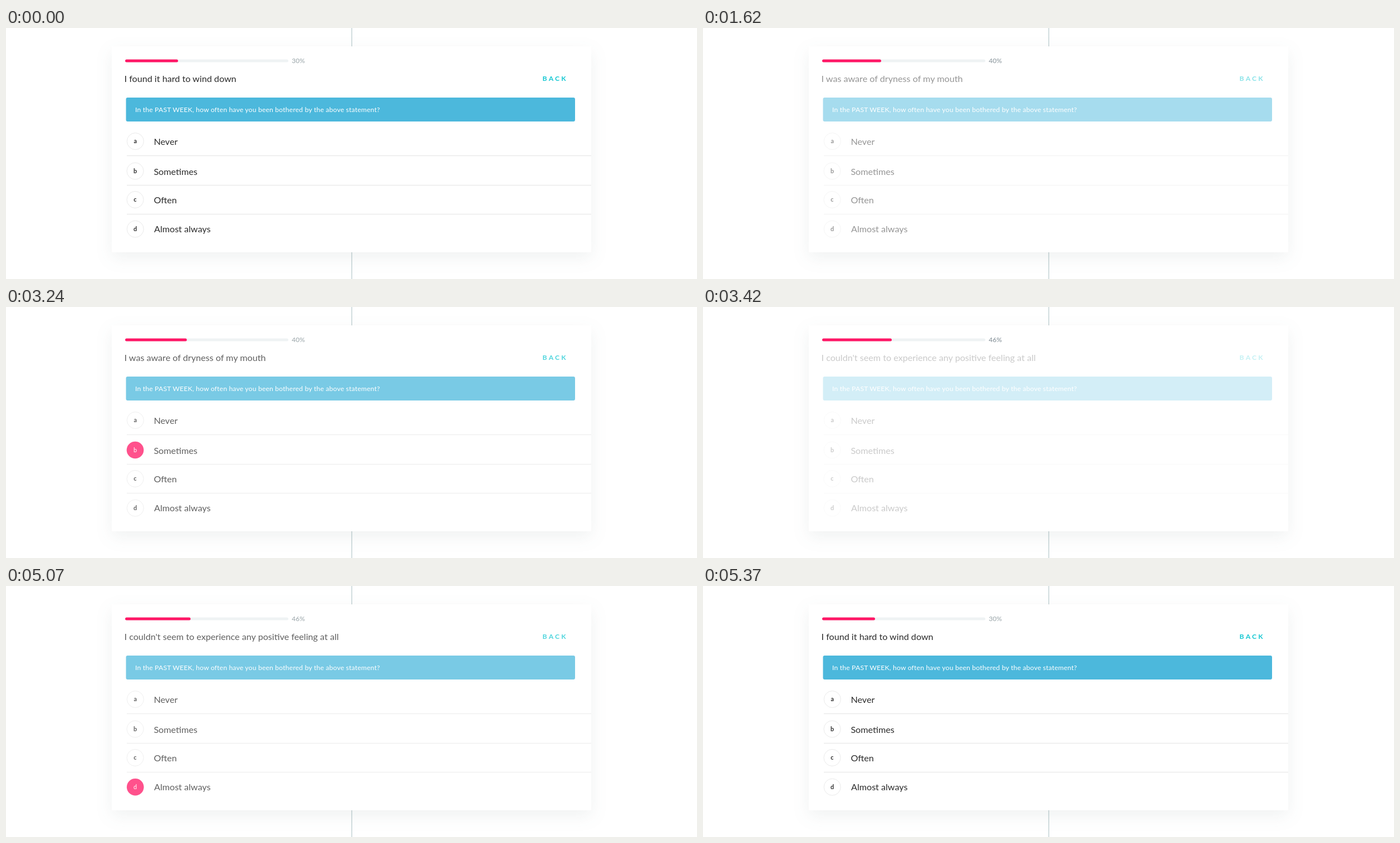
An HTML page for the animation above (5.4 s loop, 1241 by 451 pixels).

```html
<!DOCTYPE html>
<html lang="en">
<head>
<meta charset="utf-8">
<title>Questionnaire</title>
<style>
  html, body { margin: 0; width: 100%; height: 100%; overflow: hidden; background: #fff; }
  svg { display: block; width: 100%; height: 100%; font-family: Lato, "Open Sans", sans-serif; }

  .card { fill: #fff; filter: drop-shadow(0 10px 15px rgba(50, 75, 85, .075)); }
  .stem { fill: #d3dee0; }
  .track { fill: #eff3f4; }
  .bar { fill: #ff1766; width: 95px; }
  .percent { font-size: 12px; fill: #9aa5a9; }
  .title, .answer { font-size: 16.15px; fill: #2b2b2b; }
  .back { font-size: 12.2px; font-weight: 700; letter-spacing: 3.2px; fill: #12c7d2; }
  .banner { fill: #4cb8dc; }
  .prompt { font-size: 12.2px; letter-spacing: .165px; fill: #fff; }
  .ring { fill: #fff; stroke: #e9e9e9; }
  .rule { stroke: #e4e4e4; }
  .letter { font-size: 10.8px; font-weight: 700; text-anchor: middle; fill: #2b2b2b; }
  .picked circle { fill: #ff1766; }
  .picked .letter { fill: #fff; font-weight: 400; }

  /* Every change advances in four 30 ms steps of a 5400 ms loop. */
  .bar, .fade, .percent, .picked { animation: 5400ms steps(4, end) infinite; }
  .bar { animation-name: progress; }
  .fade { animation-name: fade; }
  .percent { animation-name: tint; }
  .picked { opacity: 0; }
  .pick-a { animation-name: pick-a; }
  .pick-b { animation-name: pick-b; }
  .pick-d { animation-name: pick-d; }
  .q1, .q2, .q3 { animation: 5400ms step-end infinite; }
  .q1 { animation-name: first; }
  .q2 { animation-name: second; }
  .q3 { animation-name: third; }

  @keyframes fade {
    0%, 25.55%, 31.11%, 59.44%, 64.99%, 93.33%, 99.44%, 100% { opacity: 1; }
    27.77%, 28.88%, 61.66%, 62.77%, 95.55%, 97.22% { opacity: 0; }
  }
  @keyframes progress {
    0%, 25.55%, 95.55%, 100% { width: 95px; }
    27.77%, 59.44% { width: 106px; }
    61.66%, 93.33% { width: 125px; }
  }
  @keyframes tint {
    0%, 27.76%, 31.11%, 61.65%, 64.99%, 95.54%, 99.44%, 100% { fill: #9aa5a9; }
    27.77%, 28.88%, 61.66%, 62.77%, 95.55%, 97.22% { fill: #74818a; }
  }
  @keyframes pick-a {
    0%, 12.22%, 27.77%, 100% { opacity: 0; }
    14.44%, 27.76% { opacity: 1; }
  }
  @keyframes pick-b {
    0%, 46.11%, 61.66%, 100% { opacity: 0; }
    48.33%, 61.65% { opacity: 1; }
  }
  @keyframes pick-d {
    0%, 79.99%, 95.55%, 100% { opacity: 0; }
    82.22%, 95.54% { opacity: 1; }
  }
  @keyframes first {
    0%, 95.55%, 100% { opacity: 1; }
    27.77% { opacity: 0; }
  }
  @keyframes second {
    0%, 61.66%, 100% { opacity: 0; }
    27.77% { opacity: 1; }
  }
  @keyframes third {
    0%, 95.55%, 100% { opacity: 0; }
    61.66% { opacity: 1; }
  }
</style>
</head>
<body>
<svg viewBox="0 0 1241 451">
  <rect class="stem" x="620" width="2" height="451"/>
  <rect class="card" x="190" y="33" width="861" height="370"/>

  <rect class="track" x="214" y="56.5" width="293" height="5" rx="2.5"/>
  <rect class="bar" x="214" y="56.5" height="5" rx="2.5"/>
  <g class="percent">
    <text class="q1" x="513.3" y="63.2">30%</text>
    <text class="q2" x="513.3" y="63.2">40%</text>
    <text class="q3" x="513.3" y="63.2">46%</text>
  </g>

  <g class="fade">
    <g class="title">
      <text class="q1" x="212.5" y="97">I found it hard to wind down</text>
      <text class="q2" x="212.5" y="97">I was aware of dryness of my mouth</text>
      <text class="q3" x="212.5" y="97">I couldn't seem to experience any positive feeling at all</text>
    </g>
    <text class="back" x="963.6" y="94.8">BACK</text>

    <rect class="banner" x="215.5" y="125" width="806.5" height="43" rx="3"/>
    <text class="prompt" x="232" y="150.7">In the PAST WEEK, how often have you been bothered by the above statement?</text>

    <path class="rule" d="M217 229.5H1051M217 282.5H1051M217 334.5H1051"/>

    <circle class="ring" cx="232.3" cy="203.5" r="15"/>
    <text class="letter" x="232.3" y="206.7">a</text>
    <text class="answer" x="265.4" y="209.7">Never</text>

    <circle class="ring" cx="232" cy="257" r="15"/>
    <text class="letter" x="232" y="261">b</text>
    <text class="answer" x="265.4" y="263.7">Sometimes</text>

    <circle class="ring" cx="232" cy="308.5" r="15"/>
    <text class="letter" x="231.8" y="311.6">c</text>
    <text class="answer" x="265.4" y="314.7">Often</text>

    <circle class="ring" cx="232.2" cy="361.2" r="15"/>
    <text class="letter" x="232" y="365.3">d</text>
    <text class="answer" x="266" y="367.3">Almost always</text>

    <g class="picked pick-a">
      <circle cx="232.3" cy="203.5" r="15.3"/>
      <text class="letter" x="232.3" y="206.7">a</text>
    </g>
    <g class="picked pick-b">
      <circle cx="232" cy="257" r="15.3"/>
      <text class="letter" x="232" y="261">b</text>
    </g>
    <g class="picked pick-d">
      <circle cx="232.2" cy="361.2" r="15.3"/>
      <text class="letter" x="232" y="365.3">d</text>
    </g>
  </g>
</svg>
</body>
</html>
```
